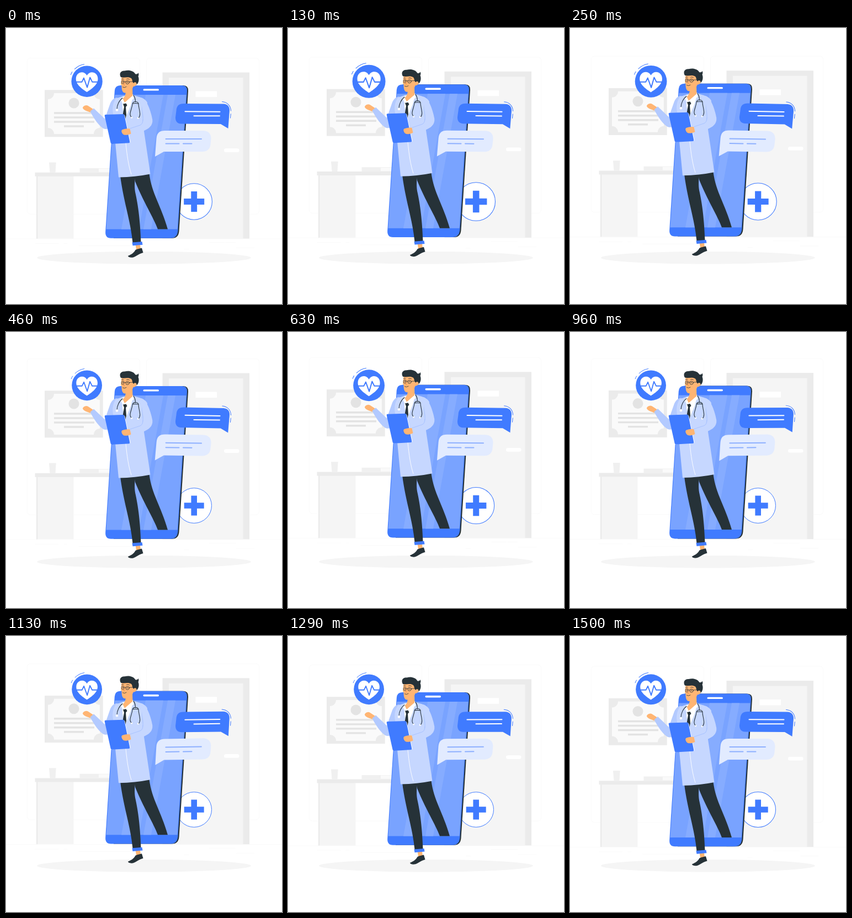
An HTML page that plays this animation: 500 px wide and 500 px high, repeating every 1.54 s.

```html
<!DOCTYPE html>
<html lang="en">
<head>
<meta charset="utf-8">
<title>Online doctor</title>
<style>
  html, body { margin: 0; height: 100%; overflow: hidden; background: #fff; }
  svg { display: block; width: 100vw; height: 100vh; }
  .line { fill: none; stroke-linecap: round; stroke-linejoin: round; }
  .blue { fill: #407bff; }
  .dark { fill: #263238; }
  .skin { fill: #ffb573; }
  .coat { fill: #c6d7ff; }
  .sleeve { fill: #b3caff; }
  .white { fill: #fff; }
  .grey1 { fill: #f5f5f5; }
  .grey2 { fill: #ebebeb; }
  .grey3 { fill: #e3e3e3; }
</style>
</head>
<body>
<svg viewBox="0 0 500 500">
  <!-- room -->
  <g class="float">
    <g fill="none" stroke="#ebebeb" stroke-width=".25">
      <rect x="38.5" y="54.4" width="204" height="282.8" rx="5.7"/>
      <rect x="254.5" y="54.4" width="204" height="282.8" rx="5.7"/>
      <path d="M0 382H500M417 398H450M322 400.7H331M396.6 388.7H416M52.5 390.4H95.6M104.6 390.4H111M131.5 394.6H225"/>
      <path d="M368 388.7H396"/>
    </g>
    <rect class="grey2" x="283.5" y="80.5" width="157.5" height="301"/>
    <rect class="grey1" x="295" y="90" width="134.5" height="291.5"/>
    <rect class="white" x="343.5" y="114.5" width="38.5" height="10.5"/>
    <rect class="white" x="395" y="218.3" width="27.5" height="6.7" rx="3.3"/>

    <rect class="grey2" x="70" y="112.3" width="105.7" height="85"/>
    <path fill="#fafafa" d="M87 118H159A11 11 0 0 0 170 129V181A11 11 0 0 0 159 192H87A11 11 0 0 0 76 181V129A11 11 0 0 0 87 118Z"/>
    <circle class="grey3" cx="123" cy="136" r="9.5"/>
    <path stroke="#e3e3e3" stroke-width="3.4" d="M87 154H160M87 162H160M87 170H160M105 178H141"/>

    <path class="grey1" d="M55 268H122.5V381.5H55Z"/>
    <path class="grey2" d="M52.5 261.7H230V268.7H52.5ZM55 268H57.3V381.5H55Z"/>
    <path fill="#f0f0f0" d="M78 243.5H90.7L89.5 261.7H79.5ZM133.5 254H200V261.7H133.5Z"/>
    <path fill="#fafafa" d="M168 254.8H200V260.8H168Z"/>
  </g>

  <ellipse class="grey1" cx="250" cy="416.2" rx="193.9" ry="11.3"/>

  <g class="pulse" data-center="340.7 314.5">
    <circle r="31.8" fill="#fff" stroke="#407bff"/>
    <path class="blue" d="M-5.3-18H5.3V-5.3H18V5.3H5.3V18H-5.3V5.3H-18V-5.3H-5.3Z"/>
  </g>

  <g class="float">
    <!-- phone -->
    <path class="dark" d="M208 104H321Q330.500 104 330 114L313.500 368Q312.500 380.800 301 380.800H195Z"/>
    <path class="blue" d="M207 104H319Q328.500 104 328 114L311.300 368Q310 380.800 298 380.800H190Q179.500 380.800 180.200 369L196.800 114Q197.500 104 207 104Z"/>
    <path fill="#79a3ff" d="M197.300 121H326.500L310.500 364.500H181.500Z"/>
    <path fill="#86acff" d="M253 121H285L241 364.500H209ZM293 121H307L263 364.500H249Z"/>
    <rect class="white" x="248.500" y="110.200" width="28.500" height="3.400" rx="1.700"/>

    <!-- legs -->
    <path class="dark" d="M232 267L259.500 264C264 300 281 322 293 364.500H275C268 345 248 313 234 278Z"/>
    <path class="dark" d="M207 268L234.500 266C233 278 232.500 287 234 297C240 324 243 350 244.500 388L229.500 389C226 350 213 315 207 268Z"/>
    <path class="skin" d="M234.500 392H243L244 401H236Z"/>
    <path class="blue" d="M228.500 388.500L246.500 387L247.500 392.700L229.500 394.300Z"/>
    <path class="dark" d="M234.500 402C238 400 242 399.500 246 398.500L248.500 407C240 409 236 414 229.500 415.700C225.500 416.300 221 415 221 412.800C227 410.500 232 407 234.500 402Z"/>

    <!-- raised arm -->
    <path class="skin" d="M139 145C138.500 142.500 144 138.500 148 140.500L158 147L153 153C147 150.500 141 149.500 139 145Z"/>
    <path class="sleeve" d="M159 145.500L179 164.500L188 139C191 130 196 126 202 126L199 172C195 179 188 183.500 180 183C171 182.500 158 162 152.500 151Z"/>

    <!-- coat -->
    <path class="coat" d="M213 123L199 128C194 135 192 144 194 155L198 208L204 270.500Q234 270 261.500 264.500L250 187L256 135C252 127 242 125 231 122Z"/>
    <path class="white" d="M211 125L230 120L231 128L217 162L211 145Z"/>
    <path class="coat" d="M230 125L219 166L222 180L236 150Z"/>
    <path class="skin" d="M217 110L229 108L229.500 124C228 130 221 134 215 135L211 128Q218 124 217 110Z"/>
    <path class="white" d="M211 126L214 134L212 139L208 130ZM230 122L231 128L219 138L215 135Z"/>
    <path class="dark" d="M212 137.500L217.500 136.500L219.500 140L217 143L218 158L215.500 167L211.500 158L214 143Z"/>
    <path class="line" stroke="#fff" stroke-width=".9" d="M217 208C219 230 222 250 227 265"/>

    <!-- clipboard and holding arm -->
    <path d="M215 157L225.500 207L190 210Z" fill="#fff"/>
    <path class="blue" d="M180 157L212.500 156Q214 156 214.500 158L224.300 206Q224.500 208 223 208.200L192 210Q190 210 189.600 208L178.700 159Q178.500 157 180 157Z"/>
    <path class="coat" d="M245 126C255 128 263 152 265.300 166C266.500 177 258 183 249 186.500L225 193L222.500 182.500L243 175.500C250 172 249 168 247 158Z"/>
    <path class="sleeve" d="M247 140C246 154 252 160 247 172C249 163 244 154 247 140Z"/>
    <path class="line" stroke="#9dbaff" stroke-width=".7" d="M225 182L243 176Q248 174 248 166"/>
    <path class="skin" d="M224.500 182.500L226.500 191.500C221 194 214 195 211.500 192C209.500 189 208.500 187 210 184.500C213 183 219 181.500 224.500 182.500Z"/>

    <!-- stethoscope -->
    <path class="line" stroke="#263238" stroke-width="1.100" d="M211 127C205 131 201 140 201 147M231 122C235 127 234 130 234.500 134M228 162C221 157 228 148 229 138C230 132 238.500 132.500 240 137C240 146 246 158 240 163M229.500 137Q234 136 240 137"/>
    <g class="white"><circle cx="201" cy="148.500" r="2.300"/><circle cx="227.700" cy="162.200" r="1.500"/><circle cx="239.300" cy="163.300" r="1.500"/></g>

    <!-- head -->
    <path class="skin" d="M210 87C208.500 92 209 97 208 102L209.500 104C209.500 110 210 117 215 117.500C222 118 228 114 230.500 106C235 106 238 102 236.500 98L232 87Z"/>
    <path class="dark" d="M208 89C204.500 83 207.500 77 215 77.500C222 75.500 231 77 234.500 83.500C237 84 239 83 239.500 81C241 84 240.500 86 239.500 87.500C241.500 92 241 99 236.500 103C237.500 99 233.500 96.500 231 100C228 97 229.500 92 226 90.500C220 87.500 214 91 208 89Z"/>
    <g class="line" stroke="#263238" stroke-width=".8">
      <ellipse cx="211.700" cy="98" rx="2.700" ry="3"/><ellipse cx="220" cy="98.500" rx="3.200" ry="3"/>
      <path d="M214.400 97.500H216.800M223.200 97.500L231 97M209.500 92.500Q211 91.500 213 92.500M218.500 92.500Q221 91 223.500 93M211.500 107Q214.500 109 218 106.500"/>
    </g>
    <g class="dark"><circle cx="212" cy="97.700" r=".9"/><circle cx="219.700" cy="98" r=".9"/></g>
    <path class="line" stroke="#ed893e" stroke-width=".8" d="M214.500 98L213 103.500H215"/>
  </g>

  <!-- chat bubbles -->
  <g class="sway" data-center="356 158">
    <path class="blue" d="M322 137L394 137.500C401 138 405 142 405 149L402.500 182L389 174L317 173.500C310 173 307 169 307 162L308.500 150C309 141 313 137 322 137Z"/>
    <path class="line" stroke="#fff" stroke-width="2" d="M324.500 151.200L387.500 151.600M340.500 159.200H387"/>
    <path class="line" stroke="#407bff" d="M391.500 133.500C400 134 407 140 407.500 150M407.300 155.500L406.500 163"/>
  </g>
  <g class="sway" data-center="320 209">
    <path fill="#e2ebff" d="M288 186H358C367 186.500 371.500 192 371.500 200L370.500 211C369.500 220 364 224 355 224H286L270 233L272.500 200C273.500 190 278 186 288 186Z"/>
    <path class="line" stroke="#8eb0ff" stroke-width="2" d="M289.500 201H354M289.500 209.500H313.500M321 209.500H336.500"/>
  </g>

  <!-- heart badge -->
  <g class="pulse" data-center="146.600 96.800">
    <circle class="blue" r="27.400"/>
    <path class="white" d="M0 18.700C-6 14.500-19.300 6.500-19.300-4.500C-19.300-17-5-20 0-10.500C5-20 19.300-17 19.300-4.500C19.300 6.500 6 14.500 0 18.700Z"/>
    <path class="line" stroke="#407bff" stroke-width="1.900" d="M-20 1H-9L-5.500-6L.5 10.500L5.500-7L9.500 1H20"/>
    <path class="line" stroke="#407bff" d="M-28.400-12Q-27.500-14.500-26-16.800M-21.500-21.800Q-14-29-4.800-30.200"/>
  </g>
</svg>
<script>
  const LOOP = 1540, LEAD = 43;

  // Linear interpolation through [position, value] stops.
  const track = (...stops) => u => {
    const i = stops.findIndex(([p], k) => k && u <= p);
    const [a, from] = stops[i - 1], [b, to] = stops[i];
    return from + (to - from) * (u - a) / (b - a);
  };
  const lift = track([0, 0], [.5, -10], [1, 0]);
  const beat = track([0, 1], [.1, 1.1], [.3, 1], [.4, 1], [.5, 1.1], [.6, 1], [1, 1]);
  const tilt = track([0, 0], [.25, 1], [.75, -1], [1, 0]);

  const each = (name, transform) => document.querySelectorAll(name)
    .forEach(el => el.setAttribute('transform', transform(el.dataset.center)));

  const start = performance.now();
  function draw(now) {
    const u = (Math.max(0, now - start) + LEAD) % LOOP / LOOP;
    each('.float', () => `translate(0 ${lift(u) + .56})`);
    each('.pulse', c => `translate(${c}) scale(${beat(u)})`);
    each('.sway', c => `rotate(${tilt(u)} ${c})`);
    requestAnimationFrame(draw);
  }
  draw(start);
</script>
</body>
</html>
```
